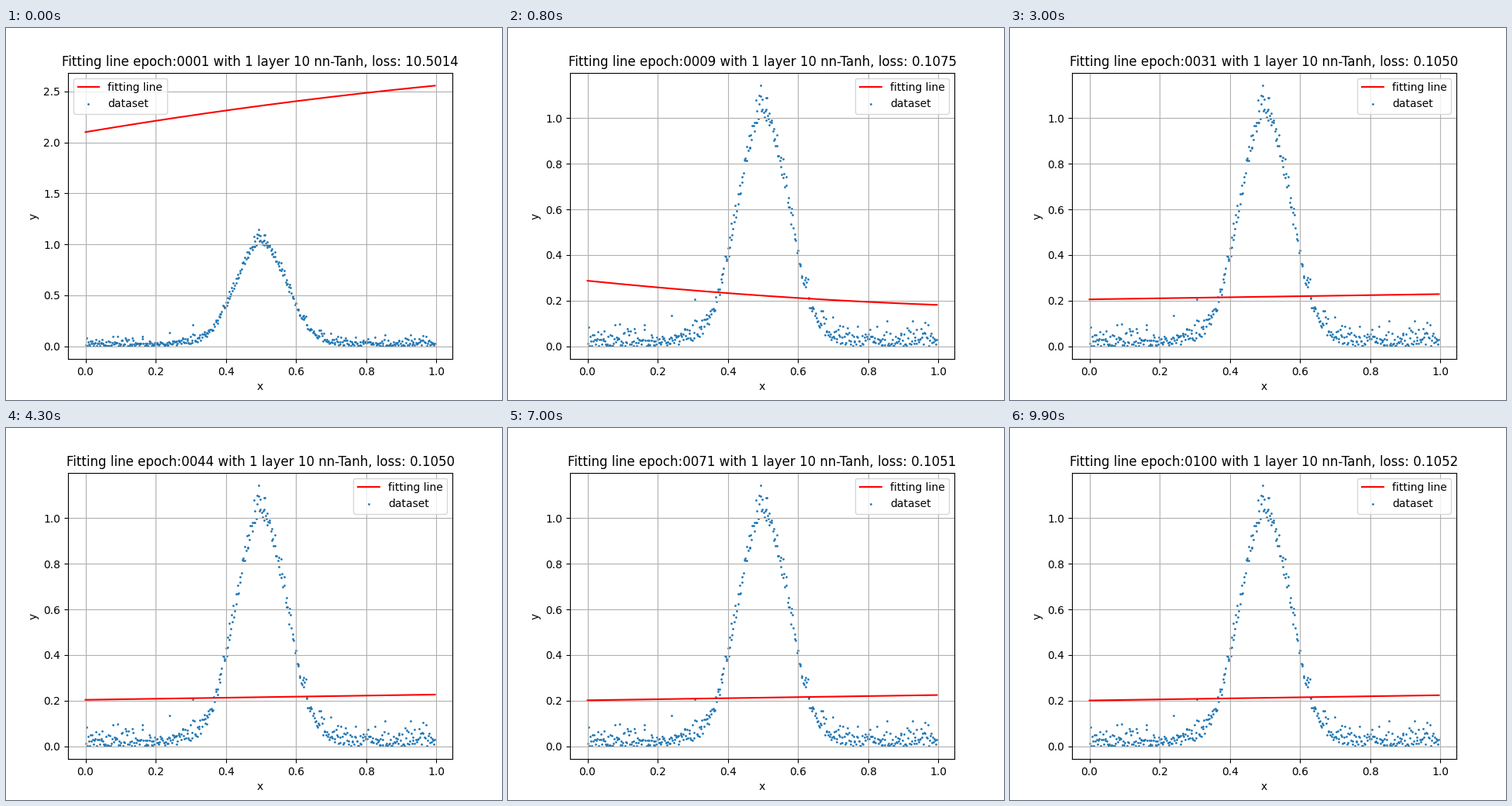
These frames come from a looping animation (640x480 px, 10 s). A matplotlib script:

```python
import matplotlib.pyplot as plt
import numpy as np
from matplotlib.animation import FuncAnimation

FRAMES, INTERVAL = 100, 100
N_POINTS = 450
X_MIN, X_MAX = .00005, .9962

# Points that stand out from the noise
OUTLIERS = [(.494, 1.142), (.509, 1.09), (.512, 1.09),
            (.481, 1.078), (.307, .206), (.240, .135)]


def make_data():
    """Noisy bell curve, with the noise kept above zero."""
    rng = np.random.default_rng(7)
    x = (np.arange(N_POINTS) + rng.random(N_POINTS)) / N_POINTS * X_MAX
    x[0], x[-1] = X_MIN, X_MAX
    noise = np.abs(rng.normal(.03, .035, N_POINTS)).clip(.0012, .11)
    y = np.exp(-100 * (x - .5) ** 2) + noise
    out_x, out_y = np.transpose(OUTLIERS)
    return np.r_[x, out_x], np.r_[y, out_y]


def fit_line(step):
    """Drops fast to the data's mean, swings to a falling slope, then settles."""
    u = fit_x - .5
    fast = .43 ** step
    swing = step * np.exp(-step / 2.376)
    mean = .212 + .0155 * np.exp(-step / 28) + 2.123 * fast
    slope = .023 + .434 * fast - .469 * swing
    bend = -.03 * fast + .045 * swing
    return mean + slope * u + bend * (4 * u ** 2 - 1 / 3)


def loss(step):
    return .105 + 10.3964 * .3528 ** step + 2e-8 * step ** 2


x, y = make_data()
fit_x = np.linspace(X_MIN, X_MAX, 200)

fig, ax = plt.subplots(figsize=(6.4, 4.8), dpi=100)
line, = ax.plot(fit_x, fit_line(0), color="red", label="fitting line")
ax.scatter(x, y, s=1, label="dataset")
ax.set_xlabel("x")
ax.set_ylabel("y")
ax.grid(True)
ax.legend(loc="best")
title = ax.set_title("")

x_pad = .05 * (X_MAX - X_MIN)
ax.set_xlim(X_MIN - x_pad, X_MAX + x_pad)


def update(step):
    fit = fit_line(step)
    line.set_ydata(fit)
    low, high = y.min(), max(y.max(), fit.max())
    pad = .05 * (high - low)
    ax.set_ylim(low - pad, high + pad)
    title.set_text(f"Fitting line epoch:{step + 1:04d} with 1 layer 10 nn-Tanh, "
                   f"loss: {loss(step):.4f}")
    return line, title


anim = FuncAnimation(fig, update, frames=FRAMES, interval=INTERVAL,
                     init_func=lambda: update(0), repeat=True, repeat_delay=0)
plt.show()
```
